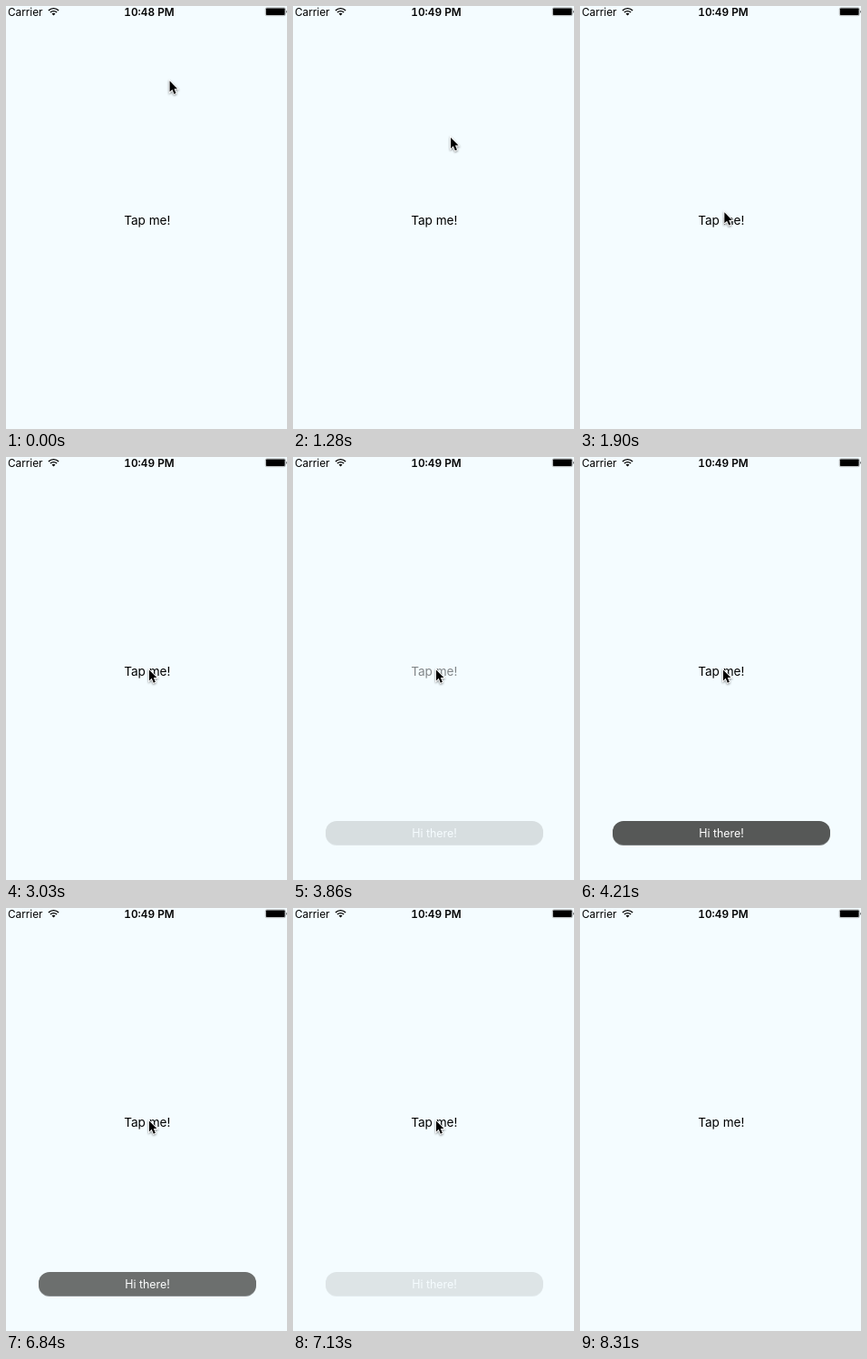
An HTML page that plays this animation: 310 px wide and 466 px high, repeating every 9.09 s.

```html
<!DOCTYPE html>
<html lang="en">
<head>
<meta charset="utf-8">
<title>Toast demo</title>
<style>
  html, body { margin: 0; width: 100%; height: 100%; overflow: hidden; background: #f4fcff; }
  svg { display: block; width: 310px; height: 466px; font-family: Inter, Roboto, sans-serif; }
  #clock { font-weight: 600; font-variant-numeric: tabular-nums; }
  #pill { filter: drop-shadow(0 1px .7px rgba(0, 0, 0, .5)); }
  #cursor { filter: drop-shadow(0 1px .8px rgba(0, 0, 0, .45)); }
</style>
</head>
<body>
<svg viewBox="0 0 310 466">
  <rect width="310" height="466" fill="#f4fcff"/>
  <g font-size="11.8">
    <text x="1.9" y="10.6">Carrier</text>
    <text id="clock" x="158" y="10.6" text-anchor="middle">10:48 PM</text>
  </g>
  <g fill="none" stroke="#000" stroke-width="1.4">
    <path d="M46.9 5a7.9 7.9 0 0 1 11.2 0"/>
    <path d="M48.9 7.1a5.1 5.1 0 0 1 7.2 0"/>
  </g>
  <path d="M52.5 10.6l-2-2a2.9 2.9 0 0 1 4 0z"/>
  <rect x="286.3" y="1.9" width="21.9" height="8.8" rx="1.4" fill="none" stroke="#999" stroke-width=".7"/>
  <rect x="286.9" y="2.5" width="20.7" height="7.6" rx=".8"/>
  <path d="M309 4.7q1.2 1.6 0 3.2z"/>
  <text id="label" x="155.8" y="241.3" font-size="13.6" text-anchor="middle">Tap me!</text>
  <g id="toast">
    <rect id="pill" x="36" y="401" width="240" height="26" rx="12" fill="#565857"/>
    <text x="156" y="418.5" font-size="12.4" fill="#fff" text-anchor="middle">Hi there!</text>
  </g>
  <g id="cursor">
    <path d="M0 0V12L2.8 9.4L4.9 14.3L6.9 13.4L4.9 8.7H8.5Z" stroke="#fff" stroke-width="1.8" paint-order="stroke"/>
  </g>
</svg>
<script>
const LOOP = 9090;
const [clock, label, toast, cursor] =
  ["clock", "label", "toast", "cursor"].map(id => document.getElementById(id));

// Share of n evenly spaced steps done by time t; the first falls on start, the last on end
function progress(t, start, end, n) {
  if (t < start) return 0;
  return Math.min(1, (Math.floor((t - start + 5) * (n - 1) / (end - start)) + 1) / n);
}

const easeOut = (p, power) => 1 - (1 - p) ** power;
const easeInOut = p => p * p * (3 - 2 * p);
const mix = (a, b, p) => a + (b - a) * p;

function cursorAt(t) {
  const enter = progress(t, 1170, 2020, 16);
  const settle = progress(t, 2500, 2610, 3) + progress(t, 2970, 3030, 2);
  const leave = easeInOut(progress(t, 7850, 8310, 9));
  const x = mix(180.6, 157.9, easeOut(enter, 1.65));
  const y = mix(82.6, 229, easeOut(enter, 2.67)) + 2.7 * settle;
  return [mix(x, 322, leave), mix(y, 482, leave)];
}

function draw(t) {
  const pressed = progress(t, 3620, 3680, 2) - progress(t, 3860, 3980, 3);
  const shown = easeOut(progress(t, 3860, 4210, 7), 1.25) - progress(t, 6840, 7190, 7);
  clock.textContent = t < 510 ? "10:48 PM" : "10:49 PM";
  label.setAttribute("opacity", 1 - .8 * pressed);
  toast.setAttribute("opacity", shown);
  cursor.setAttribute("transform", `translate(${cursorAt(t)})`);
}

const began = performance.now();
function tick() {
  draw((performance.now() - began) % LOOP);
  requestAnimationFrame(tick);
}
tick();
</script>
</body>
</html>
```
